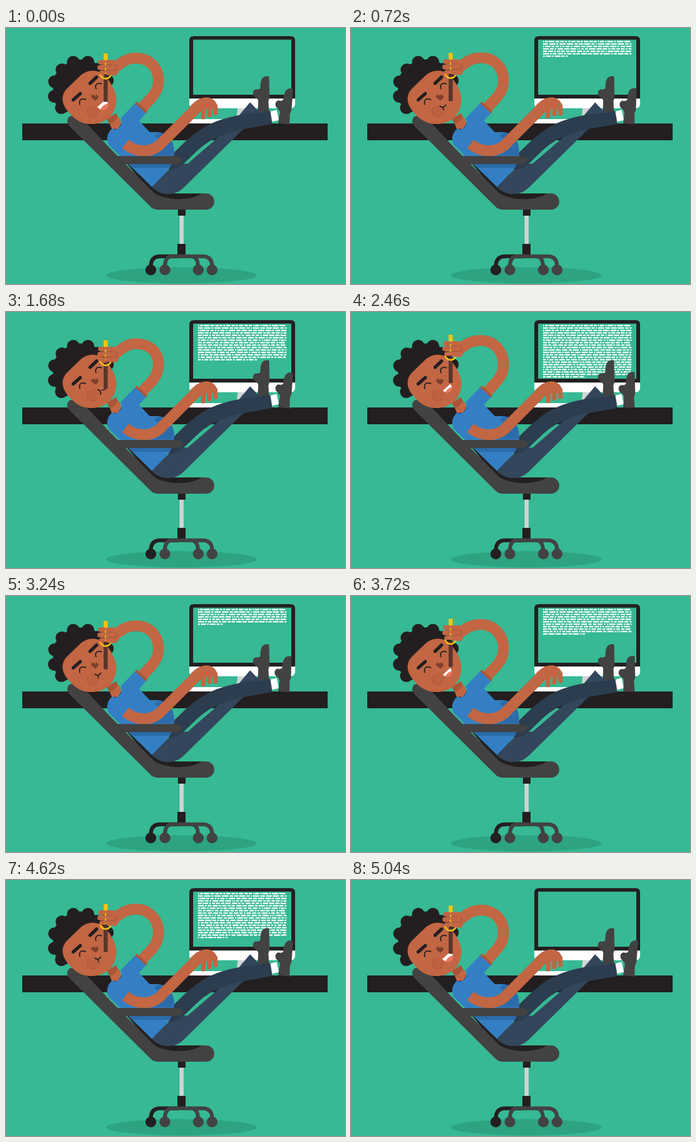
These frames come from a looping animation (625 by 472 pixels, 5070 ms). An HTML page:

```html
<!DOCTYPE html>
<html lang="en">
<head>
<meta charset="utf-8">
<style>
html, body { margin: 0; width: 100%; height: 100%; overflow: hidden; background: #36b994; }
svg { display: block; width: 625px; height: 472px; }
.ink { fill: #231f20; } .grey { fill: #424242; } .skin { fill: #c26643; } .shirt { fill: #347fc4; }
.line { fill: none; stroke-linecap: round; stroke-linejoin: round; }
.arm { fill: none; stroke: #c26643; stroke-width: 20; }
.fold { fill: none; stroke: #a95538; stroke-width: 1.5; }
</style>
</head>
<body>
<svg viewBox="0 0 625 472">
  <defs>
    <path id="shoe" class="grey" d="M485 89H479C472 90 469 97 469 108C469 113 466 114 460 113C455 115 454 121 457 125C460 129 466 130 465 137L464 155H485L484 139C483 135 485 133 486 128Z"/>
    <clipPath id="typed"><path id="reveal"/></clipPath>
  </defs>
  <ellipse cx="323.500" cy="456" rx="139" ry="15" fill="#2da382"/>

  <!-- monitor and desk -->
  <path d="M427 148H456V168H425Z" fill="#d1d3d4"/>
  <rect x="338" y="168" width="130" height="10" fill="#fff"/>
  <rect x="338" y="15" width="195" height="133" rx="8" fill="#fff"/>
  <path class="ink" d="M338 130V23Q338 15 346 15H525Q533 15 533 23V130Z"/>
  <rect x="345" y="21.500" width="181" height="101.500" fill="#36b994"/>
  <path id="code" clip-path="url(#typed)" stroke="#fff" stroke-width="2.400" fill="none"/>
  <rect class="ink" x="30" y="176" width="563" height="31"/>

  <!-- chair -->
  <path class="ink" d="M316 398H331V421H316ZM317 334H331V346H317Z"/>
  <rect x="320" y="346" width="7.500" height="52" fill="#d1d3d4"/>
  <g class="line" stroke-width="7" stroke="#424242">
    <path d="M267 440C267 427 273 421 284 421H318" stroke="#231f20"/>
    <path d="M380 440C380 427 374 421 363 421H306C297 421 293 428 293 440M354 440C354 428 350 421 341 421"/>
  </g>
  <circle class="ink" cx="267" cy="446" r="10"/>
  <g class="grey"><circle cx="293" cy="446" r="10"/><circle cx="354.500" cy="446" r="10"/><circle cx="380" cy="446" r="10"/></g>
  <path class="ink" d="M186 206L200 212L300 305H362C340 322 292 322 268 304Z"/>
  <path class="grey" d="M117 163C111 169 112 176 118 182L265 328Q271 335 280 335H369A15 15 0 0 0 369 305H361C341 319 295 319 273 304L192 222L146 173L130 160Z"/>

  <!-- legs -->
  <path d="M268 292L312 250L335 250L386 206L428 163L450 137L472 160L437 187L328 294C312 311 283 310 268 292Z" fill="#34465b"/>
  <use href="#shoe"/>
  <path d="M483 155L499 151L503 170L485 174Z" fill="#fff"/>
  <path d="M483 155L488 154L492 174L486 175Z" fill="#d1d3d4"/>
  <path d="M487 153L491 177L440 186C402 193 376 205 353 226L331 247L318 258L300 262L302 237L330 210C365 178 389 169 429 161Z" fill="#2c3d4f"/>
  <use href="#shoe" id="foot"/>

  <!-- body -->
  <path class="skin" d="M187 166L202 158L211 169L212 178L206 186H195Z"/>
  <path d="M186 168L203 157L206 164C203 171 197 176 191 177Z" fill="#a95538"/>
  <path class="shirt" d="M196 185C202 190 209 185 213 177L212 166L238 139L258 157L245 171L265 192H281C302 195 312 213 310 233C308 247 304 256 295 266L269 293L193 219C184 211 184 196 196 185Z"/>
  <path d="M263 207L282 192C301 195 311 211 310 235H235C256 237 275 228 288 215Z" fill="#2c6cab"/>
  <path d="M226 250H306L300 258H234Z" fill="#2c6cab"/>
  <path class="shirt" d="M214 218L232 203C240 193 253 189 266 193L281 205C270 217 255 220 244 219L232 208Z"/>
  <path class="arm" stroke-width="22" d="M220 214C239 229 265 231 283 216L350 149Q359 141 367 139"/>
  <path class="skin" d="M339 145C350 132 361 127 372 128C385 130 390 139 390 150L373 149L356 153Z"/>
  <g id="fingers" class="line" stroke="#c26643" stroke-width="8.500"><path/><path/><path/></g>
  <path class="grey" d="M196 236H312Q321 236 327 242Q322 251 313 251H211Z"/>

  <!-- head -->
  <g class="ink">
    <path d="M91 86L104 70L126 58L154 58L176 72L198 94L192 112L110 156L88 136L86 100Z"/>
    <g id="curls"></g>
  </g>
  <path class="skin" d="M113 111L137 88C150 76 172 75 184 90C197 104 206 124 203 138C200 166 176 178 156 177C141 177 128 170 118 158C103 143 99 125 113 111Z"/>
  <circle cx="160.500" cy="153" r="11" fill="#bd6240"/>
  <path class="line" d="M152 146A11 11 0 0 0 168 161" stroke="#b25a3b" stroke-width="1.500"/>
  <g class="line" stroke="#231f20">
    <path d="M124 132.500L137 121M155 102L167 90.500" stroke-width="6"/>
    <path d="M136 141C134 132 139 129 147 132M166 112C163 104 169 100 176 103" stroke-width="2"/>
  </g>
  <path d="M165 134L158 129C155 125 160 121 164 125C167 121 172 125 170 129Z" fill="#7c402d"/>
  <g id="open">
    <path d="M-11 0H10C11 9 5 14 -1 14C-8 13 -11 7 -11 0Z" fill="#e8775f"/>
    <path d="M-11 0H10Q10 5 7 8C2 5 -4 5 -9 7Q-11 4 -11 0Z" fill="#fff"/>
  </g>
  <path id="shut" class="line" stroke="#231f20" stroke-width="2"/>

  <!-- raised arm -->
  <path id="upper" class="arm"/>
  <path d="M238 139L241 136L261 154L258 158Z" fill="#a95538"/>
  <path class="shirt" d="M212 166L238 139L258 157L240 176Z"/>
  <g id="hand">
    <rect x="180" y="88" width="7.500" height="48" rx="1.500" fill="#59352a"/>
    <rect x="180" y="47" width="7.500" height="16" fill="#f3c40f"/>
    <path class="line" d="M173.500 86C178 96 189 96 194 86" stroke="#f3c40f" stroke-width="3"/>
    <path class="skin" d="M188 62L203 62L211 76L203 88L186 87Z"/>
    <g class="skin">
      <rect x="170" y="59" width="32" height="8" rx="3.500"/>
      <rect x="168.500" y="68.500" width="36" height="8.500" rx="3.500"/>
      <rect x="172" y="78.500" width="30" height="7.500" rx="3.500"/>
    </g>
    <path class="fold" d="M174 67.500H196M173 77.500H203Q206 71 200 67"/>
    <path d="M183.500 55V83" stroke="#f3c40f" stroke-width="2" stroke-dasharray="5 4"/>
  </g>
</svg>
<script>
const $ = id => document.getElementById(id);
const set = (id, name, value) => $(id).setAttribute(name, value);
const STEP = 60, LOOP = 5070, TYPING = 2520, BEAT = 1260, TAP = 420;
const ROWS = 22, PITCH = 4.5, LEFT = 354, RIGHT = 517, TOP = 25;

// Linear interpolation through [time, value] pairs
function track(keys, t) {
  const i = keys.findIndex(k => k[0] > t);
  const [t0, a] = keys[i - 1], [t1, b] = keys[i];
  return a + (b - a) * (t - t0) / (t1 - t0);
}

const handY = [[0, 0], [60, 3], [150, 5.5], [300, 6], [420, 5], [720, -1], [900, -4], [1080, -5.5], [1200, -5], [1260, 0]];
const mouth = [[0, 1], [120, .6], [240, 0], [900, 0], [1080, .5], [1200, .75], [1260, 1]];
const tilt = [[0, 5.7], [60, 6.5], [240, 6], [300, 3.2], [360, 0], [420, 5.7]];

let seed = 11;
const random = () => (seed = seed * 16807 % 2147483647) / 2147483647;

let dashes = '';
for (let row = 0; row < ROWS; row++) {
  for (let x = LEFT; x < RIGHT - 1;) {
    const end = Math.min(RIGHT, x + 2 + random() * 10);
    dashes += `M${x.toFixed(1)} ${TOP + row * PITCH}H${end.toFixed(1)}`;
    x = end + 1.4 + random();
  }
}
set('code', 'd', dashes);

$('curls').innerHTML = [[124, 63], [151, 63], [168, 76], [103, 77], [89.5, 99], [89, 126], [102, 147], [187, 97]]
  .map(([x, y]) => `<circle cx="${x}" cy="${y}" r="11.500"/>`).join('');

function draw(now) {
  const t = Math.floor(now % LOOP / STEP) * STEP;
  const beat = t % BEAT;

  const typed = t % TYPING / TYPING * ROWS, row = Math.floor(typed);
  const y = TOP - PITCH / 2 + row * PITCH;
  const x = LEFT + (typed - row) * (RIGHT - LEFT);
  set('reveal', 'd', `M345 20H526V${y}H${x}V${y + PITCH}H345Z`);

  const dy = track(handY, beat), top = 55.5 + dy * .6;
  set('hand', 'transform', `translate(0 ${dy})`);
  set('upper', 'd', `M248 150L266 131C278 118 281 109 281 96C281 71 262 ${top} 240 ${top}C222 ${top} 213 ${63 + dy} 196 ${77 + dy}`);

  const open = track(mouth, beat);
  set('open', 'transform', `translate(176.500 138.500) rotate(-42) scale(${.5 + .5 * open} ${open})`);
  set('shut', 'd', open ? '' : beat < 570
    ? 'M169 143C174 144 176 149 174 152M177 144Q182 144 186 139'
    : 'M164 144Q169 149 175 142M169 146L171 151');

  set('foot', 'transform', `translate(38 21.500) rotate(${track(tilt, t % TAP)} 472 153)`);

  [...$('fingers').children].forEach((finger, i) => {
    const end = [163, 160, 158][i] + 1.5 * Math.cos(2 * Math.PI * (t / TAP - i / 5));
    const tip = 363.5 + i * 11.3;
    finger.setAttribute('d', `M${365 + i * 10.3} 143Q${tip} 150 ${tip} ${end}`);
  });
}

function tick() {
  draw(performance.now());
  requestAnimationFrame(tick);
}
tick();
</script>
</body>
</html>
```
